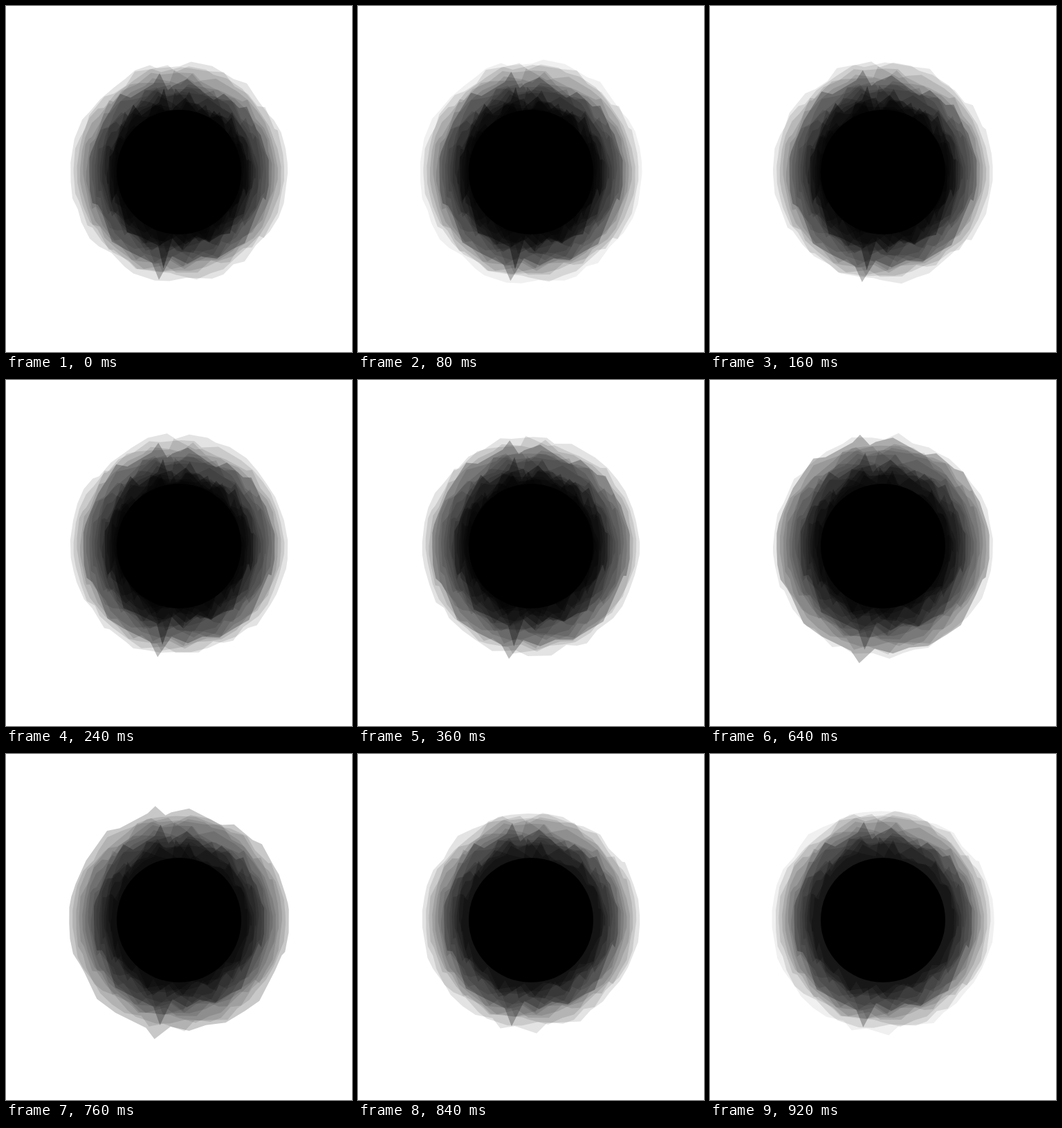
An HTML page with a canvas for the animation above (960 ms loop, 500 by 500 pixels).

```html
<!DOCTYPE html>
<html>
<head>
<meta charset="utf-8">
<style>
  html, body { margin: 0; width: 100%; height: 100%; overflow: hidden; background: #fff; }
  canvas { display: block; }
</style>
</head>
<body>
<canvas id="stage" width="500" height="500"></canvas>
<script>
const ctx = document.getElementById('stage').getContext('2d');
const LOOP = 960, STEP = 40;
const CX = 250, CY = 240;
const BASE_R = 130, MAX_R = 162, CORE_R = 90;
const GROWTH = 1.29;     // scale gained by every layer during one loop
const PER_LOOP = 8;      // layers in one generation
const VERTICES = 46;

// Teeth of the boldest layer: x on the base circle, vertical push.
const topTeeth = [[-85, -15], [-70, 2], [-37, -3], [-28, -16], [-16, 11], [-9, 5],
  [12, -5], [50, 16], [65, -1], [87, 4], [98, -9]];
const bottomTeeth = [[95, 14], [78, 7], [55, 7], [32, -4], [12, 3], [-10, -8],
  [-29, 29], [-39, 7], [-75, 7], [-97, 14]];

const clamp = v => Math.max(0, Math.min(1, v));
const random = (a, b) => {
  const v = Math.sin(a * 127.1 + b * 311.7) * 43758.5453;
  return v - Math.floor(v);
};

// A vertex is a point of the unit circle and a vertical push in pixels.
function roughArc(from, to, count, seed) {
  return Array.from({ length: count }, (_, i) => {
    const angle = from + (to - from) * (i + 0.8 * random(i, seed)) / count;
    return { x: Math.cos(angle), y: Math.sin(angle), push: 22 * (random(i, seed + 50) - 0.5) };
  });
}

function toothArc(teeth, side) {
  return teeth.map(([px, push]) => {
    const x = px / BASE_R;
    return { x, y: side * Math.sqrt(1 - x * x), push };
  });
}

const boldShape = [
  ...toothArc(topTeeth, -1), ...roughArc(-0.6, 0.6, 9, 3),
  ...toothArc(bottomTeeth, 1), ...roughArc(Math.PI - 0.6, Math.PI + 0.6, 9, 5)
];
const shapes = Array.from({ length: PER_LOOP }, (_, layer) =>
  layer ? roughArc(0, 2 * Math.PI, VERTICES, layer + 11) : boldShape);

// Teeth flatten while the layer grows.
function fillShape(shape, radius, alpha) {
  const height = (200 - radius) / 70;
  ctx.fillStyle = `rgba(0,0,0,${alpha})`;
  ctx.beginPath();
  for (const { x, y, push } of shape) ctx.lineTo(CX + x * radius, CY + y * radius + push * height);
  ctx.fill();
}

function draw(t) {
  ctx.fillStyle = '#fff';
  ctx.fillRect(0, 0, 500, 500);

  for (let i = -PER_LOOP; i < 2 * PER_LOOP; i++) {
    const radius = BASE_R * GROWTH ** (t - i / PER_LOOP);
    if (radius > MAX_R || radius < CORE_R) continue;
    const layer = (i + PER_LOOP) % PER_LOOP;
    const density = (layer ? 0.11 : 0.26) + 0.2 * clamp((120 - radius) / 25);
    fillShape(shapes[layer], radius, density * clamp((MAX_R + 2 - radius) / 6));
  }

  ctx.fillStyle = '#000';
  ctx.beginPath();
  ctx.arc(CX, CY, CORE_R, 0, Math.PI * 2);
  ctx.fill();
}

function tick(now) {
  draw(Math.floor(now % LOOP / STEP) * STEP / LOOP);
  requestAnimationFrame(tick);
}
requestAnimationFrame(tick);
</script>
</body>
</html>
```
